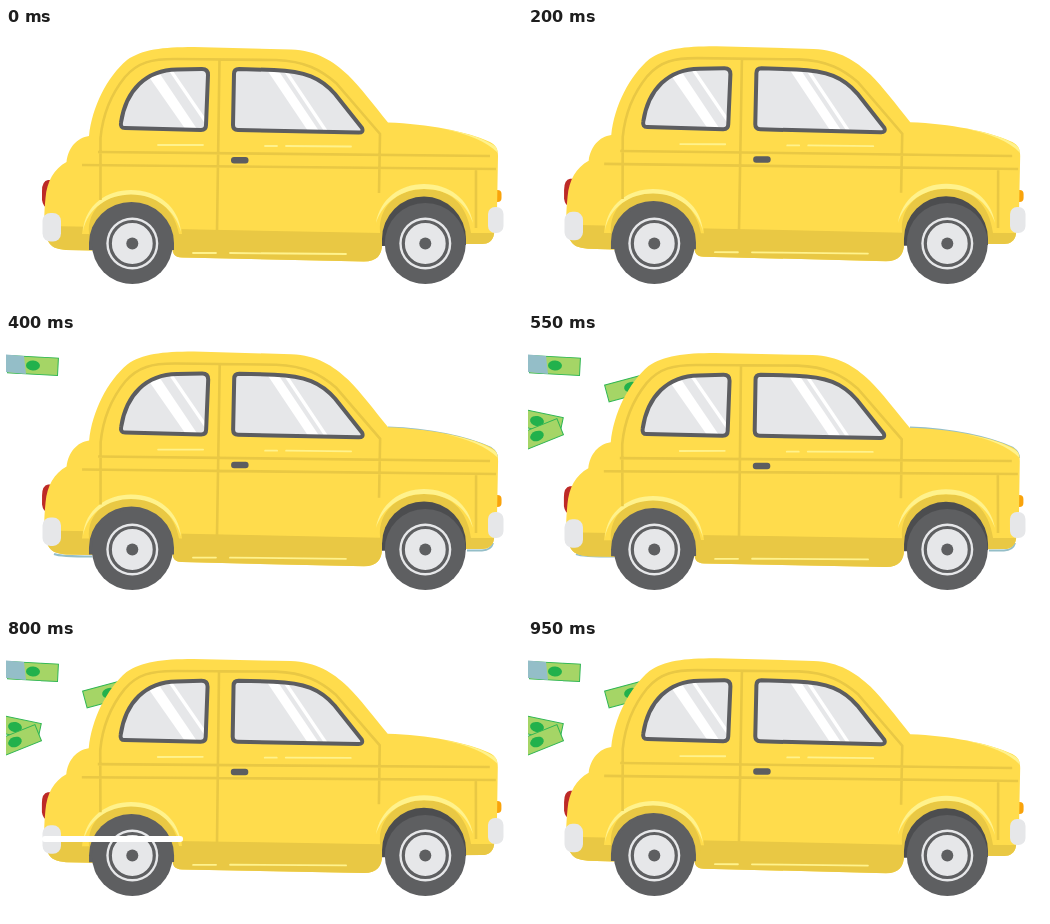
An HTML page for the animation above (1000 ms loop, 516 px wide and 278 px high).

```html
<!DOCTYPE html>
<html lang="en">
<head>
<meta charset="utf-8">
<title>Yellow car</title>
<style>
html, body { margin: 0; width: 100%; height: 100%; overflow: hidden; background: #fff; }
svg { display: block; width: 516px; height: 278px; }
.line { fill: none; stroke: #e9c844; stroke-width: 2.6; }
.glint { fill: none; stroke: #fff28c; stroke-width: 1.8; stroke-linecap: round; }
.pane { fill: #e6e7e9; }
.frame { fill: none; stroke: #5c5d60; stroke-width: 4; stroke-linejoin: round; }
</style>
</head>
<body>
<svg viewBox="0 0 516 278">
  <defs>
    <path id="shell" d="M83 108C86 79 101 49 121 32C136 21.500 156 19 188 19L285 21.500C311 22.500 327 33 342 47C355 60 367 76 382 94.500C422 96 460 103 484 114C490 117 492 121 492 128L491 182L488 206C487 213 482 216 476 216H440L376 216C376 227 371 233.500 358 233.500L176 229.500C168 229 167 226 166 219H100L86 222.500L60 222C50 221 45 219 42 213C37 202 38 186 39.500 170C41 153 48 141 60.500 134C62 120 71 109.500 83 108Z"/>
    <clipPath id="shellClip"><use href="#shell"/></clipPath>
    <path id="rearWin" d="M119 100L195 102Q200 102 200 97L202 47Q202 41 196 41L171 41.500C140 42 120 62 115 94.500Q114 100 119 100Z"/>
    <path id="frontWin" d="M233 41L268 42C299 43 315 50 329 66L356 100Q358 105 352 104.500L232 102Q227 102 227 97L228 46Q228 41 233 41Z"/>
    <clipPath id="rearClip"><use href="#rearWin"/></clipPath>
    <clipPath id="frontClip"><use href="#frontWin"/></clipPath>
    <g id="wheel">
      <circle r="40.500" fill="#5e5f61"/>
      <circle r="26" fill="#e6e7e9"/>
      <circle r="22" fill="none" stroke="#5e5f61" stroke-width="3.200"/>
      <circle r="6" fill="#5e5f61"/>
    </g>
    <g id="bill">
      <rect x="-25" y="-8.700" width="50" height="17.400" fill="#a5d566" stroke="#2fb653"/>
      <ellipse rx="7" ry="5" fill="#22b14c"/>
    </g>
  </defs>

  <g id="firstBill">
    <use href="#bill" transform="translate(27 31.500) rotate(3)"/>
    <path d="M0 20.500L18 22L20 40L0 38Z" fill="#94bec8"/>
  </g>
  <g id="laterBills">
    <use href="#bill" transform="translate(103 53) rotate(-15)"/>
    <use href="#bill" transform="translate(9 87) rotate(12)"/>
    <use href="#bill" transform="translate(9 102) rotate(-22)"/>
  </g>
  <path id="rim" d="M382 93.500C424 95 462 103 485 114Q491 118 491 124M48 220Q54 222.500 86 222.500M461 216.500H476Q485 216 487 209" fill="none" stroke="#94bec8" stroke-width="2"/>

  <g id="body">
    <path d="M48 152H42Q36 153 36 163V172Q37 179 42 180H48Z" fill="#bd2a27"/>
    <rect x="484" y="162" width="11.500" height="12" rx="4" fill="#f9a30b"/>
    <use href="#shell" fill="#ffdc4c"/>
    <g clip-path="url(#shellClip)">
      <path d="M36 198L100 199L168 201L376 205H500V240H36Z" fill="#e9c844"/>
      <path d="M438 101C462 105 478 110 492 120V125C480 113 462 106 438 101Z" fill="#fff28c"/>
    </g>
    <path d="M76 206C78 180 98 162 125 162C154 162 174 180 176 206Z" fill="#ffdc4c"/>
    <path d="M369 198C372 172 392 156 418 156C445 156 466 172 469 204H369Z" fill="#ffdc4c"/>
    <path d="M83 206C81 180 101 166 125 166C152 166 169 183 173 206V215H83Z" fill="#e9c844"/>
    <path d="M374 204C372 177 394 161 418 161C444 161 461 176 465 205V212H374Z" fill="#e9c844"/>
    <path d="M77 203C79 177 101 162 125 162C152 162 173 179 175 204C169 182 150 166.500 125 166.500C102 166.500 82 180 77 203ZM370 195C374 171 394 156 418 156C443 156 463 171 467 195C460 174 442 161 418 161C396 161 377 174 370 195Z" fill="#fff28c"/>
    <path class="line" d="M92 124L484 128M76 137L490 141M94.500 172V110C97 84 106 65 119 49C132 34 146 31 169 31L270 32C299 33 315 42 330 55L374 106L373 165M213.500 31L211 203M470 141V200"/>
    <path class="glint" d="M152 117H197M259 118H271M280 118L345 118.500M187 225H210M224 225L340 226"/>
    <use href="#rearWin" class="pane"/>
    <use href="#frontWin" class="pane"/>
    <path clip-path="url(#rearClip)" d="M143 49L152 43L191 101L180 102ZM161 40H165L202 94V100Z" fill="#fff"/>
    <path clip-path="url(#frontClip)" d="M259 39H270L315 106H304ZM275 39H279L324 106H320Z" fill="#fff"/>
    <use href="#rearWin" class="frame"/>
    <use href="#frontWin" class="frame"/>
    <rect x="225" y="129" width="17.500" height="6.500" rx="3" fill="#5c5d60"/>
    <path d="M83 222V215A42.500 41 0 0 1 168 215V222Z" fill="#5e5f61"/>
    <path d="M376 218V211A42 42.500 0 0 1 460 211V217Z" fill="#4c4d4f"/>
  </g>
  <use href="#wheel" x="126.300" y="215.500"/>
  <use href="#wheel" x="419.300" y="215.500"/>
  <g id="bumpers" fill="#e6e7e9">
    <rect x="36.500" y="185" width="18.500" height="28.500" rx="8"/>
    <rect x="482" y="179" width="15.500" height="26" rx="7"/>
  </g>
  <line id="streak" y1="199" y2="199" stroke="#fff" stroke-width="6" stroke-linecap="round"/>
</svg>
<script>
const LOOP = 1000, STEP = 50, BOB = 250;
const REAR_X = 45, FRONT_X = 490;
const el = id => document.getElementById(id);
const show = (id, on) => el(id).setAttribute("visibility", on ? "visible" : "hidden");
const wave = (t, peak) => Math.cos(2 * Math.PI * (t - peak) / BOB);

// Each axle bounces on its own phase, so the body also pitches slightly.
function bodyMatrix(t) {
  const rear = wave(t, 35) - wave(0, 35);
  const front = 0.9 * (wave(t, 225) - wave(0, 225));
  const tilt = (front - rear) / (FRONT_X - REAR_X);
  return `matrix(1 ${tilt} ${-tilt} 1 ${tilt * 200} ${rear - tilt * REAR_X})`;
}

// The head runs left ahead of the tail, both speeding up.
function drawStreak(t) {
  const age = (t - 600) / 50;
  show("streak", age >= 1 && age <= 6);
  const head = 243 - 30 * Math.pow(Math.max(age, 0), 1.4);
  const tail = 238 - 4.1 * Math.pow(Math.max(age - 1, 0), 2.5);
  el("streak").setAttribute("x1", Math.max(head, 39));
  el("streak").setAttribute("x2", Math.max(tail, 39));
}

function draw(now) {
  const t = Math.floor((now % LOOP) / STEP) * STEP;
  const m = bodyMatrix(t);
  el("body").setAttribute("transform", m);
  el("bumpers").setAttribute("transform", m);
  show("firstBill", t >= 400);
  show("laterBills", t >= 500);
  show("rim", t >= 350 && t < 600);
  drawStreak(t);
}

const start = performance.now();
function tick() {
  draw(performance.now() - start);
  requestAnimationFrame(tick);
}
tick();
</script>
</body>
</html>
```
